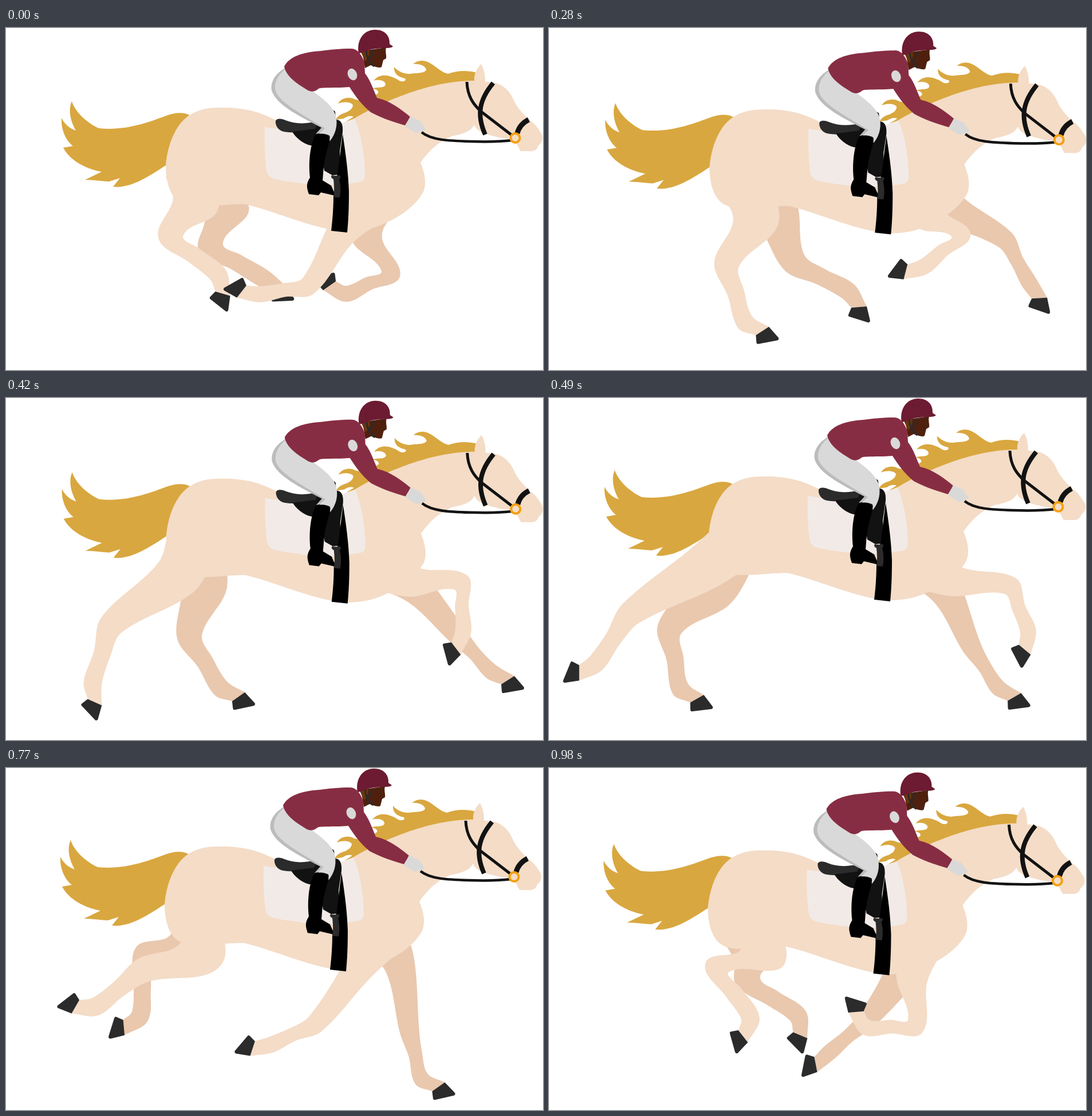
An HTML page with a canvas for the animation above (1050 ms loop, 938 by 597 pixels).

```html
<!DOCTYPE html>
<html lang="en">
<head>
<meta charset="utf-8">
<title>Galloping horse</title>
<style>
html, body { margin: 0; width: 100%; height: 100%; overflow: hidden; background: #fff; }
canvas { display: block; }
</style>
</head>
<body>
<canvas id="stage" width="938" height="597"></canvas>
<script>
const ctx = document.getElementById('stage').getContext('2d');
const STEP = 70, STEPS = 15;
const KEYS = [0, 2, 5, 7, 9, 11, 14];
const COAT = '#f4dcc7', SHADE = '#e9c8ae', HAIR = '#d9a73f', HOOF = '#2b2b2b';
const SILK = '#872d43', CAP = '#6c1b32', GREY = '#d9d9d9', TACK = '#121212';

// Bones: root joint, shin and pastern lengths, half widths from root to hoof.
const HIND = { root: [325, 255], shin: 106, pastern: 34, radii: [46, 40, 22, 15, 16, 13.5] };
const FORE = { root: [655, 290], shin: 85, pastern: 33, radii: [45, 27, 17, 12, 14, 13.5] };

// Key poses: upper joint x y, middle joint x y, shin and pastern angles in degrees.
const hindA = [
  [330, 310, 288, 364, 39, 76], [362, 310, 386, 368, 12, 83], [395, 325, 415, 424, 42, 41],
  [285, 335, 211, 403, 80, 31], [235, 350, 153, 410, 130, 168], [340, 325, 240, 353, 143, 180],
  [375, 326, 294, 348, 57, 112]
];
const hindB = [
  [385, 320, 358, 382, 31, 35], [405, 335, 426, 402, 41, 60], [333, 330, 243, 411, 90, 27],
  [268, 298, 143, 376, 125, 150], [285, 310, 158, 345, 150, 170], [315, 320, 243, 328, 95, 145],
  [362, 330, 348, 372, 35, 83]
];
const foreA = [
  [588, 355, 528, 450, 170, 188], [593, 350, 607, 422, 194, 240], [700, 325, 768, 336, 109, 125],
  [710, 320, 805, 328, 68, 100], [700, 325, 812, 422, 39, 13], [688, 345, 705, 460, 76, 25],
  [605, 375, 555, 440, 139, 139]
];
const foreB = [
  [630, 365, 672, 428, 155, 205], [685, 330, 736, 344, 100, 118], [725, 328, 810, 392, 48, 35],
  [698, 345, 738, 434, 57, 30], [600, 350, 565, 432, 100, 42], [615, 350, 540, 447, 155, 168],
  [634, 370, 640, 450, 178, 235]
];
const sway = [[0, 0], [1.5, -2.3], [1, 4.8], [0, -2], [-4, -2], [-2, -2], [-1.5, 4.8]];

// Each part: colour, path and, for lines, the width.
const behind = [
  [HAIR, 'M322 153C310 146 296 148 283 152C250 164 210 180 162 175C140 165 120 145 115 128C109 140 111 160 122 179C110 175 101 166 97 157C96 174 102 194 117 206L100 209C112 232 140 246 167 251L138 265C155 265 170 268 180 268L199 262L187 277C220 281 255 255 285 236Z'],
  [HAIR, 'M822 78C802 73 788 75 772 80C755 76 745 58 727 57C719 57 713 61 711 63C722 62 733 66 734 73C731 80 716 78 706 80C694 81 683 74 678 68C677 79 685 86 697 88C700 92 694 95 687 92C675 84 655 76 642 92C652 89 663 92 663 99C660 106 648 102 640 106C646 106 652 110 650 114C635 124 620 128 611 125C600 119 586 121 580 132C592 127 605 130 606 135C605 142 598 146 592 148C585 150 579 154 576 160L590 158C597 153 603 153 607 155L594 163L640 160L740 120L822 100Z']
];
const body = [
  [COAT, 'M319 153C335 143 350 139 372 139C415 138 442 146 470 160C510 182 560 186 605 160C650 133 735 92 818 92C817 80 823 69 830 63C835 72 837 82 837 94C862 93 878 105 887 126C893 140 906 153 915 161C926 169 929 175 936 186C939 195 935 202 930 205C928 212 923 216 914 215L899 215C894 207 892 200 886 194C865 193 850 189 836 184C826 180 820 176 818 169C812 180 800 185 778 189C757 198 740 212 724 235C732 254 735 272 729 286C716 312 680 335 650 346C625 355 595 358 568 352C520 343 465 319 420 308C400 306 375 311 340 311C320 312 305 308 295 297C283 283 279 260 279 240C282 205 295 170 319 153Z']
];
const rider = [
  ['#f2eae6', 'M452 172C470 178 500 178 580 168L609 158C621 186 627 225 627 258Q626 268 616 269C580 275 550 276 515 271C495 268 478 267 465 262Q456 258 455 248C452 225 451 200 452 172Z'],
  [HOOF, 'M471 162C473 157 482 158 488 161C505 168 525 168 545 162L556 175L540 183C515 182 495 184 482 180C474 177 470 168 471 162Z'],
  [TACK, 'M500 181L540 176L552 150C562 140 572 142 575 146L576 160C585 160 589 167 588 182L583 215L584 256L570 257L556 249L548 205L532 205C518 202 505 190 500 181Z'],
  ['#000', 'M588 185C592 210 598 250 599 285C599 315 598 335 596 357L568 354C571 330 572 310 572 290L580 250Z'],
  ['#bcbcbc', 'M487 70C467 82 462 97 464 109C472 135 515 155 551 174L541 185L570 180L520 100Z'],
  [GREY, 'M487 72C472 85 468 99 471 110C478 131 520 152 557 175L547 184L566 197C575 186 579 172 577 158C575 142 560 128 541 114Z'],
  ['#000', 'M540 187C545 183 559 184 565 188C568 195 558 218 556 235C554 248 554 258 553 266L568 275L576 293L550 287L546 292L529 290C525 278 524 272 531 261C528 235 531 205 540 187Z'],
  [HOOF, 'M569 257Q576 259 583 257Q586 261 582 264C585 275 585 285 583 296L572 295C574 285 573 274 572 264Q566 261 569 257Z'],
  ['#4f200e', 'M622 40L664 34C662 42 665 47 664 53L659 56L656 68Q653 71 637 65L627 70Z'],
  ['#6b350d', 'M620 42L634 39C636 48 631 55 627 58Z'],
  [HOOF, 'M629 40Q630 56 643 67M641 38Q641 48 631 56', 3],
  [CAP, 'M616 44C612 22 624 3 645 3C662 3 671 14 670 28L676 32Q674 35 664 35C648 35 633 37 623 43Z'],
  [SILK, 'M486 67C495 50 518 42 550 40C565 38 585 36 602 36C614 35 622 48 626 60L627 79C636 90 642 108 648 122C673 128 690 142 706 155L697 170C672 163 652 155 637 147C621 134 611 120 600 103C580 105 550 103 546 106C538 112 533 112 526 108C510 98 489 85 486 67Z'],
  [GREY, 'M706 154C712 157 717 160 722 161L733 176L728 181L724 180Q719 185 713 182L698 172Z'],
  [TACK, 'M726 182C743 196 775 197 810 198C840 199 868 198 884 196', 4.5],
  [TACK, 'M805 94C806 120 817 134 830 146L886 189', 5],
  [TACK, 'M851 96C826 126 822 152 837 186', 8],
  [TACK, 'M893 184Q897 168 913 160', 9]
];

// Cubic interpolation through the key poses, cyclic in time.
function poseAt(track, step) {
  const n = KEYS.length;
  const i = KEYS.findLastIndex(k => k <= step);
  const pose = j => track[(j + n) % n];
  const time = j => KEYS[(j + n) % n] + STEPS * Math.floor(j / n);
  const [t0, t1, t2, t3] = [i - 1, i, i + 1, i + 2].map(time);
  const h = t2 - t1, u = (step - t1) / h, v = 1 - u;
  return pose(i).map((b, k) => {
    const a = pose(i - 1)[k], c = pose(i + 1)[k], d = pose(i + 2)[k];
    const m = (c - a) / (t2 - t0) * h, q = (d - b) / (t3 - t1) * h;
    return b * v * v * (1 + 2 * u) + m * u * v * v + c * u * u * (3 - 2 * u) - q * u * u * v;
  });
}

const unit = ([x0, y0], [x1, y1]) => {
  const len = Math.hypot(x1 - x0, y1 - y0) || 1;
  return [(x1 - x0) / len, (y1 - y0) / len];
};
const along = ([x, y], [dx, dy], r) => [x + dx * r, y + dy * r];
const polar = deg => [Math.cos(deg * Math.PI / 180), Math.sin(deg * Math.PI / 180)];

function curve(pts) {
  const dirs = pts.map((p, i) => unit(pts[i - 1] || p, pts[i + 1] || p));
  for (let i = 1; i < pts.length; i++) {
    const [p, q] = [pts[i - 1], pts[i]];
    const r = Math.hypot(q[0] - p[0], q[1] - p[1]) / 3;
    ctx.bezierCurveTo(...along(p, dirs[i - 1], r), ...along(q, dirs[i], -r), ...q);
  }
}

function drawLeg(bones, [ux, uy, kx, ky, shin, pastern], colour) {
  const knee = [kx, ky], down = polar(shin);
  const fetlock = along(knee, down, bones.shin);
  const end = along(fetlock, polar(pastern), bones.pastern);
  const chain = [bones.root, [ux, uy], knee, along(knee, down, bones.shin / 2), fetlock, end];

  // The hoof leans 30 degrees forward of the pastern.
  const axis = polar(pastern + 30), side = [axis[1], -axis[0]];
  const normals = chain.map((p, i) => {
    if (i === 5) return side;
    const next = unit(p, chain[i + 1]), prev = i ? unit(chain[i - 1], p) : next;
    const [x, y] = unit([0, 0], [next[0] + prev[0], next[1] + prev[1]]);
    return [y, -x];
  });
  const edge = sign => chain.map((p, i) => along(p, normals[i], sign * bones.radii[i]));
  const rear = edge(-1), front = edge(1).reverse();
  ctx.fillStyle = colour;
  ctx.beginPath();
  ctx.moveTo(...rear[0]);
  curve(rear);
  ctx.lineTo(...front[0]);
  curve(front);
  ctx.fill();

  const heel = along(along(end, axis, 14), side, -21);
  const toe = along(along(end, axis, 30), side, 18);
  ctx.fillStyle = HOOF;
  ctx.beginPath();
  ctx.moveTo(...rear[5]);
  ctx.arcTo(...heel, ...toe, 3);
  ctx.arcTo(...toe, ...front[0], 3);
  ctx.lineTo(...front[0]);
  ctx.fill();
}

function drawParts(parts, [dx, dy]) {
  ctx.save();
  ctx.translate(dx, dy);
  for (const [colour, d, width] of parts) {
    const path = new Path2D(d);
    ctx.fillStyle = ctx.strokeStyle = colour;
    ctx.lineWidth = width || 0;
    if (width) ctx.stroke(path);
    else ctx.fill(path);
  }
  ctx.restore();
}

function drawBadges([dx, dy]) {
  ctx.fillStyle = GREY;
  ctx.beginPath();
  ctx.ellipse(605 + dx, 81 + dy, 8, 10.5, -0.4, 0, 7);
  ctx.fill();
  ctx.fillStyle = COAT;
  ctx.strokeStyle = '#f5a00f';
  ctx.lineWidth = 4;
  ctx.beginPath();
  ctx.arc(889.5 + dx, 192 + dy, 8, 0, 7);
  ctx.fill();
  ctx.stroke();
}

function draw(ms) {
  const step = Math.floor(ms / STEP) % STEPS;
  const shift = poseAt(sway, step);
  // The pairs trade sides during the stride.
  const hinds = step < 4 || step > 9 ? [hindA, hindB] : [hindB, hindA];
  const fores = step < 9 ? [foreA, foreB] : [foreB, foreA];
  const drawPair = (side, colour) => {
    drawLeg(HIND, poseAt(hinds[side], step), colour);
    drawLeg(FORE, poseAt(fores[side], step), colour);
  };
  ctx.clearRect(0, 0, 938, 597);
  drawParts(behind, shift);
  drawPair(1, SHADE);
  drawParts(body, shift);
  drawPair(0, COAT);
  drawParts(rider, shift);
  drawBadges(shift);
}

function loop(now) {
  draw(now);
  requestAnimationFrame(loop);
}
draw(0);
requestAnimationFrame(loop);
</script>
</body>
</html>
```
